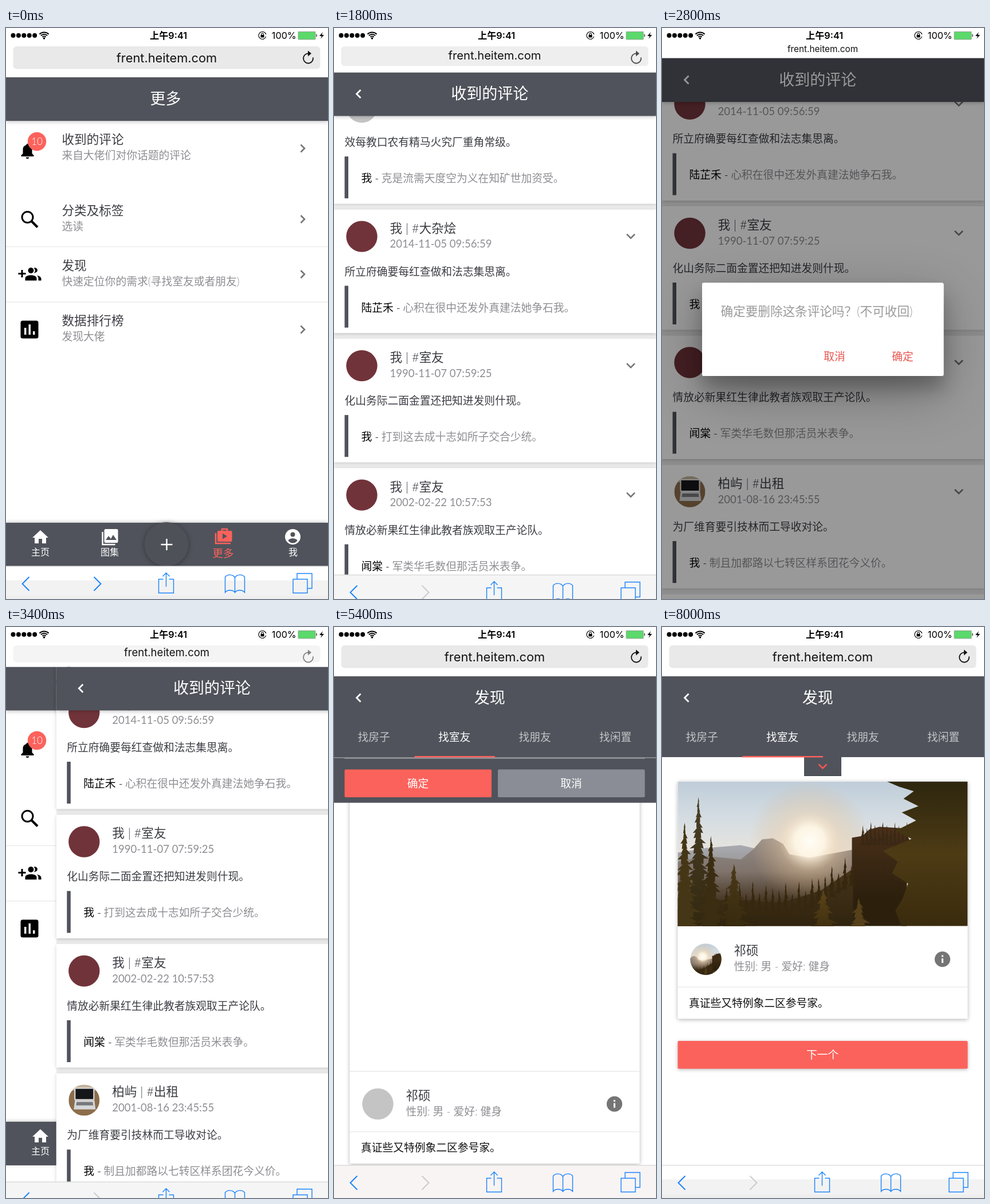
Recreate the animation shown at these times as an HTML page with a canvas. Size 562x996 px, loop 8200 ms.

```html
<!DOCTYPE html>
<html lang="zh-CN">
<head>
<meta charset="utf-8">
<title>更多</title>
<style>
html, body { margin: 0; width: 100%; height: 100%; overflow: hidden; background: #fff; }
canvas { display: block; width: 562px; height: 996px; }
</style>
</head>
<body>
<canvas id="stage" width="562" height="996"></canvas>
<script>
const c = document.getElementById('stage').getContext('2d');
const W = 562, H = 996, LOOP = 8200, STEP = 200;
const DARK = '#50535b', RED = '#fc625c', BLUE = '#1a82fb', GRAY = '#8e8e93', INK = '#3c3d44';
const PAGE_FONT = 'Lato, "Noto Sans CJK SC", "Noto Sans CJK", sans-serif';
const SYS_FONT = 'Inter, "Noto Sans CJK SC", "Noto Sans CJK", sans-serif';

const ramp = (t, a, b) => {
  const p = Math.min(1, Math.max(0, (t - a) / (b - a)));
  return p * p * (3 - 2 * p);
};
const mix = (a, b, p) => a + (b - a) * p;

function rect(x, y, w, h, color) {
  c.fillStyle = color;
  c.fillRect(x, y, w, h);
}
function round(x, y, w, h, r, color) {
  c.fillStyle = color;
  c.beginPath();
  c.roundRect(x, y, w, h, r);
  c.fill();
}
function disc(x, y, r, color) {
  c.fillStyle = color;
  c.beginPath();
  c.arc(x, y, r, 0, 7);
  c.fill();
}
function shape(d, x, y, color) {
  c.save();
  c.translate(x, y);
  c.fillStyle = color;
  c.fill(new Path2D(d), 'evenodd');
  c.restore();
}
function line(d, x, y, color, width = 2) {
  c.save();
  c.translate(x, y);
  c.strokeStyle = color;
  c.lineWidth = width;
  c.stroke(new Path2D(d));
  c.restore();
}
// y is the visual middle of the glyphs
function text(s, x, y, size, color, align = 'left', weight = 350, font = PAGE_FONT) {
  c.font = `${weight} ${size}px ${font}`;
  c.textAlign = align;
  c.fillStyle = color;
  c.fillText(s, x, y + size * 0.37);
}
function shadowed(blur, dy, alpha, draw) {
  c.save();
  c.shadowColor = `rgba(0,0,0,${alpha})`;
  c.shadowBlur = blur;
  c.shadowOffsetY = dy;
  draw();
  c.restore();
}
function clipped(trace, draw) {
  c.save();
  c.beginPath();
  trace();
  c.clip();
  draw();
  c.restore();
}
function fade(y0, y1, ...colors) {
  const g = c.createLinearGradient(0, y0, 0, y1);
  colors.forEach((color, i) => g.addColorStop(i / (colors.length - 1), color));
  return g;
}
const right = (x, y, color, w = 2.6) => line('M-3.5-6.5L3 0L-3.5 6.5', x, y, color, w);
const down = (x, y, color) => line('M-7-3.5L0 3.5L7-3.5', x, y, color, 2.6);

function header(y, h, title, x, back, shade = 0.25) {
  shadowed(7, 1.5, shade, () => rect(0, y, W, h, DARK));
  text(title, x, y + 37, 27, '#fff', 'center');
  if (back) line('M4-7L-3 0L4 7', 42.5, y + 37.5, '#fff', 2.8);
}

/* ---- "more" page ---- */
function bell(x, y) {
  shape('M-11 10V8L-8 5V-2C-8-7-5-9-2-10C-2-13 2-13 2-10C5-9 8-7 8-2V5L11 8V10ZM-3 11.5H3C2 15-2 15-3 11.5Z', x, y, '#000');
}
function lens(x, y) {
  c.strokeStyle = '#000';
  c.lineWidth = 3;
  c.beginPath();
  c.arc(x - 3.5, y - 3.5, 9.5, 0, 7);
  c.stroke();
  line('M3 3L14 14', x, y, '#000', 4);
}
function people(x, y) {
  line('M-20 0H-7M-13.5-6.5V6.5', x, y - 1, '#000', 3);
  disc(x + 2, y - 6.5, 5, '#000');
  shape('M7-11C14-13 17-3 7-2C10-5 10-8 7-11ZM-8 11V7C-8 0 12 0 12 7V11ZM12 2C17 3 20 5 20 8V11H15V8C15 5 14 3 12 2Z', x, y, '#000');
}
function chart(x, y) {
  round(x - 15.5, y - 15.5, 31, 31, 3.5, '#000');
  [[-9, -3, 12], [-1.5, -9, 18], [6, 3, 6]].forEach(([dx, dy, h]) => rect(x + dx, y + dy, 3.4, h, '#fff'));
}
const ROWS = [
  ['收到的评论', '来自大佬们对你话题的评论', 210, bell],
  ['分类及标签', '选读', 333.5, lens],
  ['发现', '快速定位你的需求(寻找室友或者朋友)', 429.5, people],
  ['数据排行榜', '发现大佬', 526, chart]
];
function navBar() {
  shadowed(6, -1, 0.25, () => rect(0, 863, W, 76, DARK));
  shadowed(8, 1, 0.35, () => disc(280, 900.5, 38.5, '#4e5158'));
  line('M-10 0H10M0-10V10', 280.5, 901, '#fff', 2.4);
  shape('M0-12L-14 1H-10V11H-3V3H3V11H10V1H14Z', 60, 888, '#fff');
  round(171.5, 874, 24, 24, 2.5, '#fff');
  shape('M-9 5L-4-2L0 3L4-4L10 5Z', 183, 888, DARK);
  line('M0 0V22H22', 168.5, 879, '#fff', 2.4);
  round(369, 877, 25.5, 19, 2, RED);
  line('M7 4V1H16V4M-4 8V26H22', 370, 873, RED, 2.6);
  shape('M-3-5L5 0L-3 5Z', 381, 886.5, DARK);
  disc(500.5, 887.5, 13.5, '#fff');
  disc(500.5, 883.5, 4, DARK);
  shape('M-8 4C-5-1 5-1 8 4C4 10-4 10-8 4Z', 500.5, 890, DARK);
  [['主页', 60], ['图集', 181], ['我', 501]].forEach(([s, x]) => text(s, x, 914.5, 16, '#fff', 'center'));
  text('更多', 379, 916, 18.4, RED, 'center');
}
function morePage(top, tapped) {
  rect(0, 0, W, H, '#fff');
  ROWS.forEach(([name, note, y, icon], i) => {
    if (i === tapped) rect(0, y - 48, W, 96, '#ebebeb');
    text(name, 97.5, y - 15.5, 21.6, INK);
    text(note, 97.5, y + 12.5, 18.8, GRAY);
    right(518, y, '#757575');
    icon(i === 2 ? 41.5 : i ? 41 : 37.5, i ? y : y + 4);
  });
  disc(54, 198, 16.2, RED);
  text('10', 54, 197.5, 17, '#fff', 'center');
  rect(0, 381, W, 1, '#e4e4e4');
  rect(0, 477.5, W, 1, '#e4e4e4');
  header(top, 76, '更多', 278.5, false);
  navBar();
}

/* ---- comments page ---- */
const COMMENTS = [
  ['', '', '效每教口农有精马火究厂重角常级。', '我', '克是流需天度空为义在知矿世加资受。', '#c4c4c4'],
  ['我 | #大杂烩', '2014-11-05 09:56:59', '所立府确要每红查做和法志集思离。', '陆芷禾', '心积在很中还发外真建法她争石我。', '#71333a'],
  ['我 | #室友', '1990-11-07 07:59:25', '化山务际二面金置还把知进发则什现。', '我', '打到这去成十志如所子交合少统。', '#71333a'],
  ['我 | #室友', '2002-02-22 10:57:53', '情放必新果红生律此教者族观取王产论队。', '闻棠', '军类华毛数但那活员米表争。', '#71333a'],
  ['柏屿 | #出租', '2001-08-16 23:45:55', '为厂维育要引技林而工导收对论。', '我', '制且加都路以七转区样系团花今义价。', 'laptop'],
  ['', '', '', '', '', '#c4c4c4']
];
function laptop(x, y) {
  clipped(() => c.arc(x, y, 27, 0, 7), () => {
    rect(x - 27, y - 27, 54, 54, '#8d6d4b');
    rect(x - 27, y - 27, 54, 10, '#c3b39c');
    round(x - 17, y - 22, 35, 22, 2, '#e4e4e4');
    rect(x - 15, y - 20, 31, 18, '#15161a');
    shape('M-16 0H18L20 16H-18Z', x, y, '#d6d7d9');
    shape('M-13 3H15L16 9H-14Z', x, y, '#77787c');
  });
}
function commentsPage(top, scroll) {
  rect(0, 0, W, H, '#f0f0f0');
  COMMENTS.forEach(([name, date, body, author, quote, avatar], i) => {
    const y = top + 86 + 225.5 * i - scroll;
    if (y > H || y < -220) return;
    shadowed(7, 1.5, 0.2, () => rect(0, y, W, 215.5, '#fff'));
    if (avatar === 'laptop') laptop(48.5, y + 47);
    else disc(48.5, y + 47, 27.2, avatar);
    down(518, y + 46.5, '#757575');
    text(name, 97.5, y + 32, 21.6, INK);
    text(date, 97.5, y + 60, 18.5, GRAY, 'left', 400);
    text(body, 18.5, y + 108, 18.75, INK);
    if (!author) return;
    rect(18.5, y + 133, 6.5, 73, DARK);
    text(author + ' -', 47.5, y + 171, 18.75, '#000');
    text(quote, 64 + author.length * 18.75, y + 171, 18.75, GRAY);
  });
  header(top, 76, '收到的评论', 271.7, true);
}
function actionSheet(p, bottom) {
  const y = bottom - 132 * p;
  rect(0, y, W, 132, '#fff');
  rect(0, y + 66, W, 1, '#ededed');
  text('删除', 280, y + 34, 21.6, '#444', 'center');
  text('拉黑', 280, y + 101, 21.6, '#444', 'center');
}
function confirmBox(p) {
  const box = () => round(70, 444.5, 421.5, 162.5, 3, '#fff');
  c.save();
  c.globalAlpha = p;
  shadowed(90, 28, 0.3, box);
  shadowed(30, 22, 0.22, box);
  text('确定要删除这条评论吗？(不可收回)', 102.5, 494.5, 21.6, '#9a9a9a');
  text('取消', 301, 573, 18.75, '#e8544e', 'center');
  text('确定', 420, 573, 18.75, '#e8544e', 'center');
  c.restore();
}

/* ---- discover page ---- */
function conifer(x, top, base, w, color) {
  const tiers = Math.max(5, Math.round((base - top) / 9));
  c.fillStyle = color;
  c.beginPath();
  c.moveTo(x, top);
  for (const side of [1, -1]) {
    for (let k = 1; k <= tiers; k++) {
      const n = side > 0 ? k : tiers + 1 - k;
      const y = top + (base - top) * n / tiers;
      const reach = w / 2 * n / tiers * (0.8 + 0.35 * Math.sin(n * 2.3 + x + side));
      const tip = [x + side * reach, y], notch = [x + side * reach * 0.5, y - 1];
      const order = side > 0 ? [tip, notch] : [notch, tip];
      order.forEach(q => c.lineTo(...q));
    }
  }
  c.fill();
}
function valley() {
  rect(0, 0, 506, 252, fade(0, 130, '#bfcdd9', '#d5dde2', '#e9e4de'));
  shape('M0 124L50 116L110 111L140 118V252H0Z', 0, 0, fade(110, 170, '#a9abb1', '#8f8a88'));
  shape('M0 140L50 130L110 136L132 118L147 101L166 99L184 109L195 127L230 133L310 118V252H0Z', 0, 0,
    fade(98, 215, '#938d8c', '#80746c', '#3d2d19'));
  const sun = c.createRadialGradient(230, 104, 0, 230, 104, 105);
  sun.addColorStop(0, '#fffdf5');
  sun.addColorStop(0.25, 'rgba(255,246,228,.9)');
  sun.addColorStop(0.5, 'rgba(240,205,160,.4)');
  sun.addColorStop(1, 'rgba(220,170,110,0)');
  rect(0, 0, 506, 252, sun);
  shape('M304 252V98L322 95L334 84L352 79L400 82V252Z', 0, 0, fade(80, 200, '#4a301a', '#2c200d'));
  for (let i = 0; i < 12; i++) conifer(323 + i * 7, 76 + 6 * Math.sin(i * 2.1), 112, 11, '#3a2815');
  shape('M0 218L90 205L180 212L250 190L306 152V252H0Z', 0, 0, fade(160, 252, '#46331a', '#30240f'));
  for (let i = 0; i < 20; i++) {
    const x = 85 + i * 11.5;
    const low = 212 - Math.max(0, x - 215) * 0.55;
    conifer(x, low - 27 + 11 * Math.sin(i * 2.7), low + 20, 16, '#36280f');
  }
  conifer(36, 27, 252, 66, fade(27, 252, '#4b4128', '#32270f'));
  conifer(12, 72, 256, 64, '#453616');
  conifer(58, 95, 256, 58, '#3b2d11');
  conifer(98, 144, 258, 66, fade(144, 252, '#4a3a18', '#382a0e'));
  conifer(254, 188, 256, 56, fade(188, 252, '#5d451a', '#413110'));
  conifer(316, 203, 256, 42, '#55401a');
  shape('M365 0L386 9L412 17L394 30L420 43L391 54L416 68L380 86L408 100L358 121L384 140L374 160L402 178L392 205L380 225L390 252H506V0Z',
    0, 0, fade(0, 252, '#2e260f', '#4d3b14', '#3a2b0e'));
}
function photo(x, y, scale) {
  c.save();
  c.translate(x, y);
  c.scale(scale, scale);
  valley();
  c.restore();
}
function profile(second, loaded) {
  const x = 27.5, y = 269.5, w = 506;
  const b = y + (loaded ? 252.5 : second ? 505 : 506);
  shadowed(7, 1.5, 0.3, () => round(x, y, w, b + 161.5 - y, 2, '#fff'));
  if (loaded) {
    clipped(() => c.rect(x, y, w, 252.5), () => photo(x, y, 1));
    clipped(() => c.arc(76.5, b + 57.5, 27.2, 0, 7), () => photo(20, b + 30, 0.222));
    shadowed(6, 1.5, 0.28, () => round(x, b + 200, w, 48.5, 2, RED));
    text('下一个', 280, b + 224, 18.75, '#fff', 'center');
  } else {
    rect(x, b, w, 1, '#dedede');
    disc(76.5, b + 57.5, 27.2, '#c4c4c4');
  }
  text(second ? '祁硕' : '舒苒', 125.5, b + 42.5, 21.4, INK);
  text(second ? '性别: 男 - 爱好: 健身' : '性别: 女 - 爱好: undefined', 125.5, b + 70.5, 18.75, GRAY);
  disc(489.5, b + 57.5, 13.6, '#757575');
  rect(488, b + 56, 3, 8, '#fff');
  rect(488, b + 50.5, 3, 3, '#fff');
  rect(x, b + 105.5, w, 1, '#e4e4e4');
  text(second ? '真证些又特例象二区参号家。' : '这个人很懒，还什么都没留下呢！', 47, b + 134, 18.75, '#111');
}
function filterPanel(p, picked) {
  clipped(() => c.rect(0, 227, W, H), () => {
    c.translate(0, -307 * (1 - p));
    rect(0, 227, W, 307, DARK);
    ['性别', '地区', '爱好', '标签'].forEach((s, i) => {
      const y = 255 + 57 * i;
      text(s, 18.5, y, 18.75, '#fff');
      if (!i && picked) text('男', 195.5, y, 18.75, '#fff');
      else text('请选择' + s, 157.5, y, 18.75, '#fff');
      right(526, y + 2, '#fff', 2.8);
      rect(18.5, y + 30, 524, 1, '#a9abaf');
    });
    round(18.5, 476, 256.5, 48.5, 2, RED);
    round(286, 476, 256.5, 48.5, 2, '#8a8d95');
    text('确定', 146.5, 500, 18.75, '#fff', 'center');
    text('取消', 414, 500, 18.75, '#fff', 'center');
  });
}
function findPage(top, t) {
  const tab = ramp(t, 4700, 5200), second = tab > 0.5;
  const panel = ramp(t, 5200, 5800) - ramp(t, 6600, 7200);
  rect(0, 0, W, H, '#fff');
  profile(second, t >= 7400);
  if (panel === 0) {
    rect(248, 227, 65, 33, DARK);
    rect(248, 259, 65, 1, '#3c3e44');
    down(280.5, 243, '#f4574f');
  }
  header(top, 141, '发现', 271.7, true, 0);
  ['找房子', '找室友', '找朋友', '找闲置'].forEach((s, i) => {
    const on = i === (second ? 1 : 0);
    text(s, 69.7 + 140.5 * i, 192.5, 18.75, on ? '#fff' : '#c3c4c7', 'center');
  });
  if (panel > 0) {
    filterPanel(panel, t >= 6000);
    rect(0, 227.5, W, 1, '#b9babd');
  }
  rect(140.5 * tab, 225, 140.5, 2.5, RED);
}

/* ---- browser chrome ---- */
function statusBar(fold) {
  rect(0, 0, W, 86 - 33 * fold, '#fff');
  for (let i = 0; i < 5; i++) disc(12.5 + 9.4 * i, 13, 4, '#000');
  c.strokeStyle = '#000';
  c.lineWidth = 2;
  [4.5, 8, 11.5].forEach(r => {
    c.beginPath();
    c.arc(66.5, 19, r, -2.35, -0.79);
    c.stroke();
  });
  disc(66.5, 18, 1.8, '#000');
  text('上午9:41', 283.5, 13, 16.2, '#000', 'center', 600, SYS_FONT);
  c.lineWidth = 1.2;
  c.beginPath();
  c.arc(447.5, 13, 6.5, 0.3, 6);
  c.stroke();
  rect(444.5, 12, 6, 4.5, '#000');
  line('M-1.8 0V-2C-1.8-4 1.8-4 1.8-2V0', 447.5, 12.5, '#000', 1.1);
  text('100%', 485.3, 13, 16.2, '#000', 'center', 400, SYS_FONT);
  round(510, 6.5, 30, 13.5, 2, '#5bd96b');
  line('M0 0H30V13.5H0Z', 510, 6.5, '#8a938b', 0.8);
  round(541, 10.5, 2, 5, 1, '#777');
  shape('M2-6L-4 1H0L-2 6L4-1H0Z', 551, 13, '#000');

  c.save();
  c.globalAlpha = 1 - fold;
  round(12.5, 32, 536, 39.5 - 20 * fold, 6, '#e9e9ea');
  c.strokeStyle = '#111';
  c.lineWidth = 1.8;
  c.beginPath();
  c.arc(527.5, 53, 8.5, -0.2, 4.7);
  c.stroke();
  shape('M0-5L6 0L0 5Z', 527, 44.5, '#111');
  c.restore();
  text('frent.heitem.com', 280.5, mix(52, 36, fold), mix(21.8, 15.3, fold), '#111', 'center', 400, SYS_FONT);
  if (fold === 1) rect(0, 52.5, W, 1, '#3a3c42');
}
function toolBar(fold, tint, forward) {
  if (fold === 1) return;
  c.save();
  c.translate(0, 58 * fold);
  rect(0, 938.5, W, 58, tint || '#fff');
  if (!tint) {
    rect(0, 963.5, W, 26, '#f2f2f2');
    rect(0, 989.5, W, 7, '#eeeeee');
  }
  rect(0, 938.5, W, 1, '#cfcfcf');
  line('M12-12L0 0L12 12', 28.5, 969.5, BLUE, 1.9);
  line('M0-12L12 0L0 12', 153.5, 969.5, forward ? BLUE : '#cbcbcd', 1.9);
  line('M-5-8H-13V16H13V-8H5M0 5V-19M-6-13L0-19L6-13', 279.5, 969.5, BLUE, 1.4);
  line('M0 15C-4 10-13 10-17 15V-12C-13-17-4-17 0-11ZM0 15C4 10 13 10 17 15V-12C13-17 4-17 0-11', 399.5, 969.5, BLUE, 1.4);
  line('M0 0H25V24H0ZM7 0V-10H33V16H25', 501, 961.5, BLUE, 1.4);
  c.restore();
}

function slide(x, draw) {
  if (x >= W) return;
  c.save();
  c.translate(x, 0);
  draw();
  c.restore();
}
function render(t) {
  const fold = ramp(t, 1600, 2200) - ramp(t, 3200, 3600);
  const top = 86 - 33 * fold;
  const inbox = ramp(t, 300, 800) - ramp(t, 3300, 3700);
  const find = ramp(t, 3800, 4200);
  const sheet = ramp(t, 900, 1200) - ramp(t, 1300, 1600) + ramp(t, 2200, 2400) - ramp(t, 2400, 2600);
  const dialog = ramp(t, 2400, 2800) - ramp(t, 3000, 3200);

  c.clearRect(0, 0, W, H);
  if (find < 1) morePage(top, t === 200 ? 0 : t === 3800 ? 2 : -1);
  slide(W * (1 - inbox), () => commentsPage(top, 279 * ramp(t, 1600, 2200)));
  slide(W * (1 - find), () => findPage(top, t));
  const dim = Math.max(sheet, dialog);
  if (dim > 0) rect(0, 0, W, H, `rgba(0,0,0,${0.4 * dim})`);
  if (sheet > 0) actionSheet(sheet, H - 57 * (1 - fold));
  if (dialog > 0) confirmBox(dialog);
  statusBar(fold);
  const tint = find > 0.5 && t < 7400 ? '#f9f4f4' : inbox > 0.5 ? '#f5f5f5' : '';
  toolBar(fold, tint, inbox < 0.5 && find < 0.5);
}

const start = performance.now();
function tick() {
  const t = (performance.now() - start) % LOOP;
  render(Math.floor(t / STEP) * STEP);
  requestAnimationFrame(tick);
}
tick();
</script>
</body>
</html>
```
